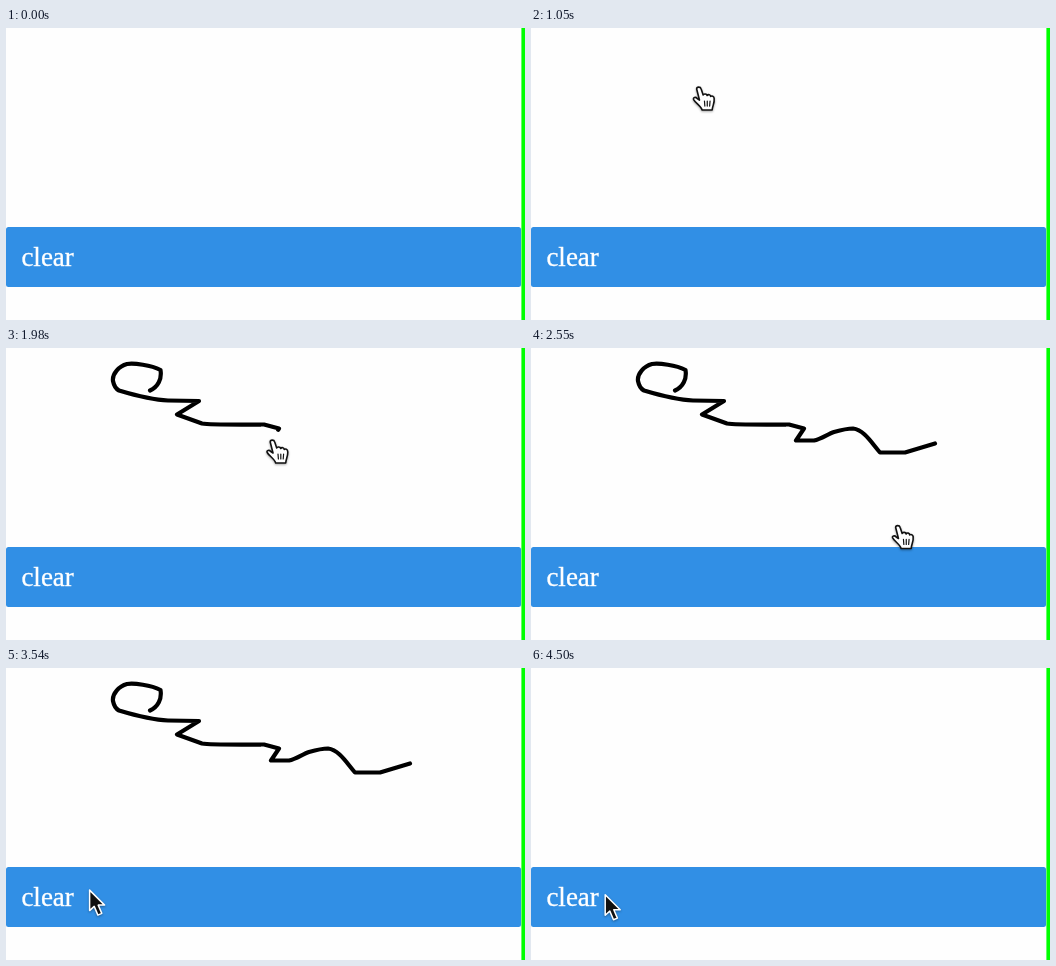
An HTML page for the animation above (4530 ms loop, 519x292 px).

```html
<!DOCTYPE html>
<html lang="en">
<head>
<meta charset="utf-8">
<title>Drawing pad</title>
<style>
  html, body { margin: 0; width: 100%; height: 100%; overflow: hidden; background: #fefefe; }
  svg { display: block; }
  text { font: 27px "Liberation Serif", "Times New Roman", serif; fill: #fff; stroke: #fff; stroke-width: .35px; }
  .soft { filter: blur(.4px); }
  #cursor { filter: drop-shadow(0 1px 1px rgba(0, 0, 0, .35)); }
</style>
</head>
<body>
<svg width="519" height="292" viewBox="0 0 519 292">
  <rect width="519" height="292" fill="#fefefe"/>
  <g class="soft">
    <rect y="199" width="515" height="60" rx="2.5" fill="#318fe5"/>
    <text x="15.4" y="238">clear</text>
  </g>
  <rect x="515" width="1" height="292" fill="#6f6"/>
  <rect x="516" width="3" height="292" fill="#0f0"/>
  <path id="ink" class="soft" fill="none" stroke="#000" stroke-width="4.2" stroke-linecap="round" stroke-linejoin="round"/>
  <g id="cursor">
    <g id="hand" transform="translate(-5.5 -1.5)" stroke="#111" stroke-linecap="round" stroke-linejoin="round">
      <path fill="#fff" stroke-width="1.6" d="M4 3C4 .5 7.8 .5 8.5 3L10.5 9C11 7.5 14 7.5 14.5 9.5C15.5 8 18 8.5 18 10.5C19 9.5 21.5 10 21.5 12.5C22 17 20 19 19.5 24H9.5C8.5 20 3 17 1 13.5C0 11.5 3 10.5 4.5 12.5L6.8 14Z"/>
      <path fill="none" stroke-width="1.2" d="M11.8 15L12.2 20M14.6 15V20M17.4 15L17 20"/>
    </g>
    <path id="arrow" transform="translate(-.8 .8)" fill="#111" stroke="#fff" stroke-width="1.5" stroke-linejoin="round" d="M0 0V20.5L4.6 16.3L8.3 25L12.2 23.3L8.6 15H15Z"/>
  </g>
</svg>
<script>
const LOOP = 4530, TICK = 30, CLEAR = 4230, BUTTON_TOP = 199, INK_LAG = 24;

const $ = id => document.getElementById(id);
const ink = $('ink'), cursor = $('cursor'), hand = $('hand'), arrow = $('arrow');

const linear = k => k;
const smooth = k => k * k * (3 - 2 * k);

// One pointer movement along a curve between two times
function move(start, end, d, ease = smooth) {
  const path = document.createElementNS(ink.namespaceURI, 'path');
  path.setAttribute('d', d);
  const total = path.getTotalLength();
  const lengthAt = t => total * ease(Math.min(1, Math.max(0, (t - start) / (end - start))));
  return { start, d, lengthAt, pointAt: t => path.getPointAtLength(lengthAt(t)) };
}

const enter = move(440, 1170, 'M430 300Q400 210 366 191.5Q260 108 142 46');
const draw = move(1430, 2240, `M144 42.5C152 39 156 31 154.5 22C145 17 128 15 121 16
  C113 18 106 26 107 33C108 38 110 41 113 42.5C128 47 148 52 162 52.5L193 53L171 66.5L196 75.5
  C205 77 240 76.5 258 76.5L273 80.5L265 92.5H283C290 91 297 86 303 84
  C310 82 317 80.5 322 80.5C333 82 340 94 349 104.5H374L404 95.5`, linear);
const leave = move(2290, 3150, 'M404 95.5C380 190 300 270 200 272C150 272 110 240 87 220');
const nudge = move(3450, 3750, 'M87 220L75 226');
const moves = [enter, draw, leave, nudge];

ink.setAttribute('d', draw.d);

function render(t) {
  const current = moves.findLast(m => m.start <= t) || enter;
  const { x, y } = current.pointAt(t);
  cursor.setAttribute('transform', `translate(${x} ${y})`);
  const overPad = y < BUTTON_TOP;
  hand.style.display = overPad ? '' : 'none';
  arrow.style.display = overPad ? 'none' : '';

  // The line trails slightly behind the pointer.
  const drawn = t < CLEAR ? draw.lengthAt(t - INK_LAG) : 0;
  ink.style.display = drawn > 0 ? '' : 'none';
  ink.setAttribute('stroke-dasharray', `${drawn} 1000`);
}

const start = performance.now();
function frame() {
  const t = (performance.now() - start) % LOOP;
  render(Math.floor(t / TICK) * TICK);
  requestAnimationFrame(frame);
}
render(0);
requestAnimationFrame(frame);
</script>
</body>
</html>
```
